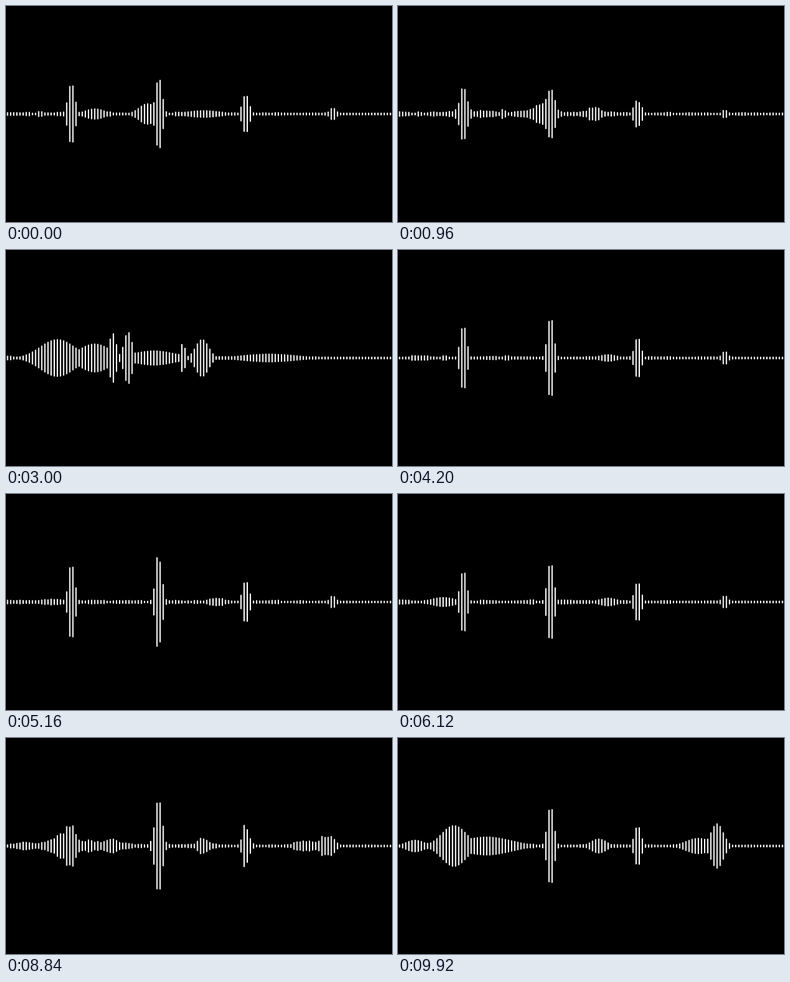
An HTML page with a canvas for the animation above (9.96 s loop, 608 by 342 pixels).

```html
<!DOCTYPE html>
<html lang="en">
<head>
<meta charset="utf-8">
<title>Audio bars</title>
<style>
  html, body { margin: 0; width: 100%; height: 100%; overflow: hidden; background: #000; }
  canvas { display: block; }
</style>
</head>
<body>
<canvas id="stage" width="608" height="342"></canvas>
<script>
const ctx = document.getElementById('stage').getContext('2d');
const W = 608, H = 342, BARS = 124, PITCH = W / BARS, BAR = 2;
const STEP = 40, LOOP = 9960, LOUDEST = 72;
const FIRST_TONE = 20.52, OCTAVE = 28, TONES = [52, 65, 33, 11];

// Repeatable noise in 0..1
function noise(a, b) {
  let n = Math.imul(a + 1, 374761393) ^ Math.imul(b + 7, 668265263);
  n = Math.imul(n ^ (n >>> 13), 1274126177);
  return ((n ^ (n >>> 16)) >>> 0) / 4294967296;
}

const bell = (x, mid, spread) => Math.exp(-(((x - mid) / spread) ** 2) / 2);

// Evenly spaced tones, drowned out where the voice is loud
function pose(time, level, spread, ...voice) {
  const bars = Array.from({ length: BARS }, (_, i) => {
    const rest = 2.2 + 3 * (1 - i / BARS) * noise(i >> 1, time) ** 2;
    const speech = Math.max(0, ...voice.map(([mid, width, h]) => h * bell(i, mid, width)));
    const duck = Math.max(0, 1 - (speech / 30) ** 2);
    const tones = TONES.map((h, k) => h * level * duck * bell(i, FIRST_TONE + OCTAVE * k, spread));
    return Math.max(rest, speech, ...tones);
  });
  return { time, bars };
}

// Voice bumps are [bar, spread, height]
const poses = [
  pose(0, 0.96, 1.08, [28, 3.2, 9], [45, 2.8, 17], [63, 6, 6]),
  pose(1880, 0.48, 1.3, [20.5, 1.7, 31], [21, 6, 8], [33.5, 0.9, 11], [45, 6, 11], [48.3, 1.9, 25], [62.5, 1.9, 21]),
  pose(3000, 0, 1, [16, 5.5, 30], [28, 5, 23], [33.8, 1.1, 40], [38.7, 1.3, 42],
    [47, 7, 12], [56.3, 0.8, 24], [62.5, 2.1, 30], [84, 9, 7]),
  pose(4200, 1.03, 1.02, [67, 3, 6]),
  pose(6120, 1, 1.03, [14, 4, 8], [67, 3, 7]),
  pose(7760, 0.9, 1.3, [34, 1, 12], [62.5, 1.4, 19]),
  pose(9920, 1, 1.05, [5, 3, 10], [17.5, 4, 33], [28, 8, 15], [64, 2.5, 12], [96, 4, 13], [102, 2, 36]),
];

function heights(step) {
  const t = step * STEP;
  const at = poses.findLastIndex(p => p.time <= t);
  const a = poses[at], b = poses[at + 1] || { time: LOOP, bars: a.bars };
  const u = (t - a.time) / (b.time - a.time);
  const loose = Math.min(1, (t - a.time) / 200, (b.time - t) / 200) * (at + 1 < poses.length);

  const bars = a.bars.map((h, i) => {
    const mid = h + (b.bars[i] - h) * u;
    // Flicker runs in small groups of neighbouring bars
    const group = noise(i >> 2, step + 50), single = noise(i, step + 500);
    return Math.max(2, mid * (1 + loose * (0.4 * group + 0.3 * single - 0.35)));
  });

  // One swell a second lifts the tallest bars
  const top = Math.max(...bars);
  const swell = Math.sin(Math.PI * t / 1000) ** 16 * (LOUDEST / top - 1);
  return bars.map(h => h * (1 + swell * h / top));
}

let shown = -1;
function draw() {
  const step = Math.floor(performance.now() % LOOP / STEP);
  if (step !== shown) {
    shown = step;
    ctx.fillStyle = '#000';
    ctx.fillRect(0, 0, W, H);
    ctx.fillStyle = '#fff';
    ctx.beginPath();
    heights(step).forEach((h, i) => {
      ctx.roundRect((i + 0.5) * PITCH - BAR / 2, H / 2 - h, BAR, h * 2, BAR / 2);
    });
    ctx.fill();
  }
  requestAnimationFrame(draw);
}
draw();
</script>
</body>
</html>
```
